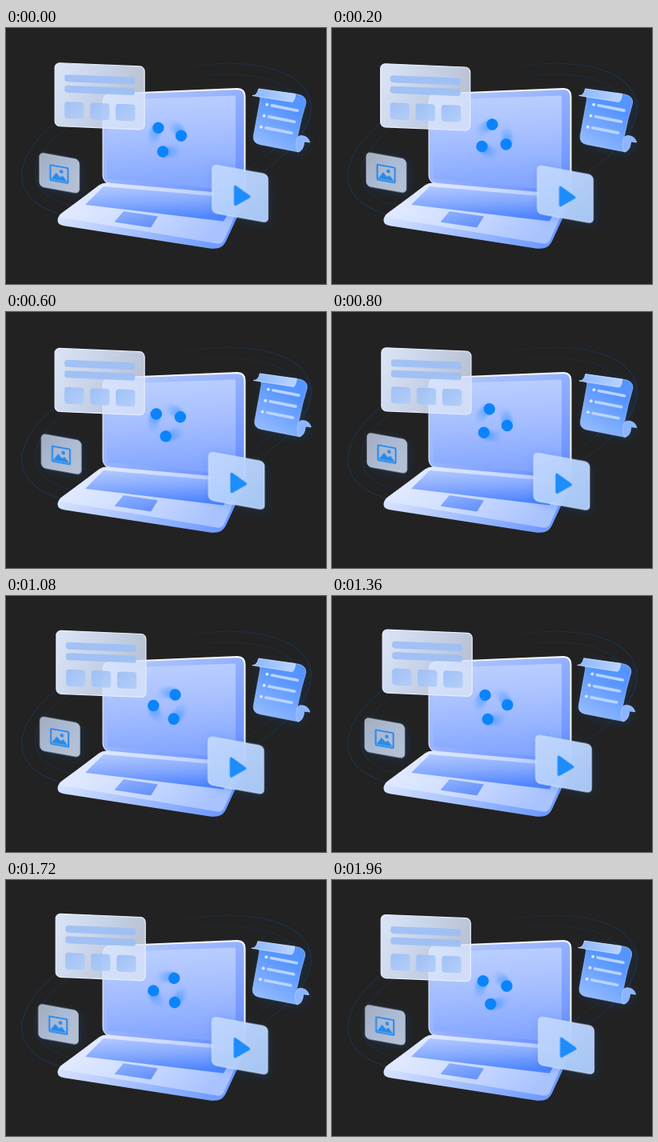
Animation of 400x320 px, one loop 2 s. Source, as an HTML page:

```html
<!DOCTYPE html>
<html lang="en">
<head>
<meta charset="utf-8">
<title>Floating cards around a laptop</title>
<style>
  html, body { margin: 0; width: 100%; height: 100%; overflow: hidden; background: #222; }
  svg { display: block; width: 400px; height: 320px; }
</style>
</head>
<body>
<svg id="stage" viewBox="0 0 400 320">
  <defs id="defs">
    <filter id="glow" x="-40%" y="-40%" width="180%" height="180%">
      <feDropShadow dx="2" dy="2" stdDeviation="6" flood-color="#0a5cc0" flood-opacity=".25"/>
    </filter>
    <filter id="soft" x="-30%" y="-30%" width="160%" height="160%">
      <feGaussianBlur stdDeviation="1.8"/>
    </filter>
  </defs>
</svg>
<script>
const LOOP = 2000, TAU = 2 * Math.PI;
const stage = document.getElementById('stage'), defs = document.getElementById('defs');

function add(parent, tag, attrs = {}) {
  const node = document.createElementNS('http://www.w3.org/2000/svg', tag);
  for (const key in attrs) node.setAttribute(key, attrs[key]);
  return parent.appendChild(node);
}

// Evenly spaced linear gradient from the top left towards (x2, y2).
function blend(x2, y2, ...colors) {
  const id = 'blend' + defs.children.length;
  const gradient = add(defs, 'linearGradient', { id, x2, y2 });
  colors.forEach((color, i) =>
    add(gradient, 'stop', { offset: i / (colors.length - 1), 'stop-color': color }));
  return `url(#${id})`;
}

// Polygon whose corners are rounded over a length r.
function shape(parent, text, r, fill) {
  const points = text.split(' ').map(pair => pair.split(',').map(Number));
  const n = points.length;
  const d = points.map(([x, y], i) => {
    const near = ([px, py]) => {
      const k = Math.min(r / Math.hypot(px - x, py - y), .5);
      return [x + (px - x) * k, y + (py - y) * k];
    };
    return `${near(points[(i + n - 1) % n])}Q${x},${y} ${near(points[(i + 1) % n])}`;
  });
  return add(parent, 'path', { d: `M${d.join('L')}Z`, fill });
}

const box = (parent, x, y, width, height, rx, fill, more) =>
  add(parent, 'rect', { x, y, width, height, rx, fill, ...more });
const path = (parent, d, fill, more) => add(parent, 'path', { d, fill, ...more });
const disc = (parent, cx, cy, r, fill, opacity = 1) =>
  add(parent, 'circle', { cx, cy, r, fill, opacity });
const edge = (stroke, width = 1) => ({ stroke, 'stroke-width': width });

function drawOrbits() {
  const stroke = blend(1, 0, '#1a3454', '#1a345488', '#1a345400', '#1a345488', '#1a3454');
  const orbits = add(stage, 'g', { fill: 'none', stroke, transform: 'translate(200.5 142) rotate(-16.8)' });
  for (const inset of [0, 17])
    add(orbits, 'ellipse', { rx: 187 - inset, ry: 85 - inset * .8, opacity: 1 - inset / 50 });
}

function drawLaptop() {
  const g = add(stage, 'g');
  shape(g, '120.5,82 299.5,74.5 299.5,212 120.5,194', 11, '#f4f7ff');
  shape(g, '121.5,83.5 297.5,77 297.5,212 121.5,193', 9, blend(.9, .9, '#b7ccff', '#98b3ff', '#6b92ff'));
  shape(g, '126.5,90 287,84.5 287,203.5 126.5,188', 2, blend(.1, 1, '#bdd1ff', '#a5beff', '#82a5ff'));
  shape(g, '121,194 298,210 297,219 272,273 261,276.5 64.5,246 64.5,235', 8, blend(1, .2, '#e4ecff', '#a9c3ff', '#6f9bff'));
  shape(g, '121,193 298,208.5 270,270.5 64,236', 6, blend(1, .35, '#eaf0ff', '#d0deff', '#a9c3ff'));
  shape(g, '122,198 289,212.5 272,241.5 99,221', 1, blend(.2, 1, '#b4caff', '#88abff', '#4e85ff'));
  shape(g, '147,229 190,235.5 181,249.5 135.5,242.5', 1, blend(.6, 1, '#8fb1ff', '#6793fa'));
}

// Three dots on a circle, each followed by a fading trail.
function drawSpinner() {
  const g = add(stage, 'g'), trail = add(g, 'g', { filter: 'url(#soft)' });
  const dot = (parent, turn, opacity) => disc(
    parent, 17.5 * Math.cos(turn * TAU), 17.5 * Math.sin(turn * TAU), 7.2, '#0b84fb', opacity);
  for (let i = 0; i < 3; i++) {
    for (let k = 1; k <= 12; k++) dot(trail, i / 3 - k / 65, .085 * (1 - k / 13));
    dot(g, i / 3, 1);
  }
  return turn => g.setAttribute('transform', `translate(201.8 138) rotate(${109 + 360 * turn})`);
}

// A slanted group drifting about (x, y); waves are [size, phase in turns] per axis.
function floating(x, y, slant, waveX, waveY, filter, paint) {
  const g = add(stage, 'g', { filter });
  paint(g);
  const wave = (turn, [size, phase]) => size * Math.sin((turn + phase) * TAU);
  return turn => g.setAttribute('transform',
    `translate(${x + wave(turn, waveX)} ${y + wave(turn, waveY)}) skewY(${slant})`);
}

function paintList(g) {
  box(g, 0, 0, 112, 79, 6, blend(1, .3, '#e4edfff5', '#dbe7ffe6', '#d8e2f6d4'), edge('#e6eefc', 1.2));
  for (const y of [14, 27.5]) box(g, 12, y, 88, 9, 3.5, '#9dbff5', { opacity: .9 });
  const tile = blend(1, 1, '#9abdf6', '#b1cdf9');
  for (let i = 0; i < 3; i++) box(g, 12 + 32 * i, 48, 24.3, 21, 4, tile, { opacity: .9 });
}

function paintPhoto(g) {
  const blue = '#278be9';
  box(g, 0, 0, 49.5, 42, 5, blend(1, .6, '#a3acbb', '#a9b9d4', '#b4c0d4'), edge('#c8d3e6', .8));
  box(g, 13.5, 13, 22, 18.6, .5, 'none', edge(blue, 2.2));
  shape(g, '14.5,30 21,21 25.5,26 29,23.5 34.5,30', 1, blue);
  disc(g, 27.3, 18.9, 2.3, blue);
}

function paintScroll(g) {
  path(g, 'M53 6.5Q67 8 66 18Q60 37 56 58Q53 70 57 79L8 69.5Q-.5 67.5 .5 59L9 13L7 1Z',
    blend(-.5, 1, '#5795ff', '#84b1ff', '#b9d3ff'), edge('#a9caff', .6));
  path(g, 'M-1 8.5Q5 9 7 0L53 6.5Q52 15 49 16.5Z', blend(1, 0, '#8bb6ff', '#b9d4ff'), edge('#d4e4ff', .8));
  path(g, 'M55 62Q57 57.5 63 59Q69 60 71 67L64 66Q63 78 56 79Q52 72 55 62Z', '#8bb5ff', edge('#b8d2ff', .7));
  for (let i = 0; i < 3; i++) {
    const x = 17.5 - 3.7 * i, y = 19.7 + 14 * i;
    disc(g, x, y, 2, '#d5e6ff');
    path(g, `M${x + 6} ${y + 1.2}l32 6.3`, 'none', { ...edge('#b9d4ff', 3.6), 'stroke-linecap': 'round' });
  }
}

function paintPlay(g) {
  box(g, 0, 0, 69.5, 60, 5.5, blend(1, 1, '#c2d7fff7', '#a9cbfaf5'), edge('#cfe1ff'));
  shape(g, '27,19.6 49.5,31.5 27,48', 4, '#1d8dfb');
}

drawOrbits();
drawLaptop();
const movers = [
  drawSpinner(),
  floating(61.9, 43.5, 2.4, [1.3, -.4], [1.8, 0], 'none', paintList),
  floating(42.5, 153.1, 10.2, [1.9, -.05], [2.7, .25], 'url(#glow)', paintPhoto),
  floating(309, 77, 0, [1.4, -.02], [1.1, -.31], 'url(#glow)', paintScroll),
  floating(255.1, 173.1, 10.2, [2.9, .3], [2.6, -.2], 'url(#glow)', paintPlay)
];

const start = performance.now();
function tick() {
  const turn = (performance.now() - start) % LOOP / LOOP;
  movers.forEach(move => move(turn));
  requestAnimationFrame(tick);
}
tick();
</script>
</body>
</html>
```
